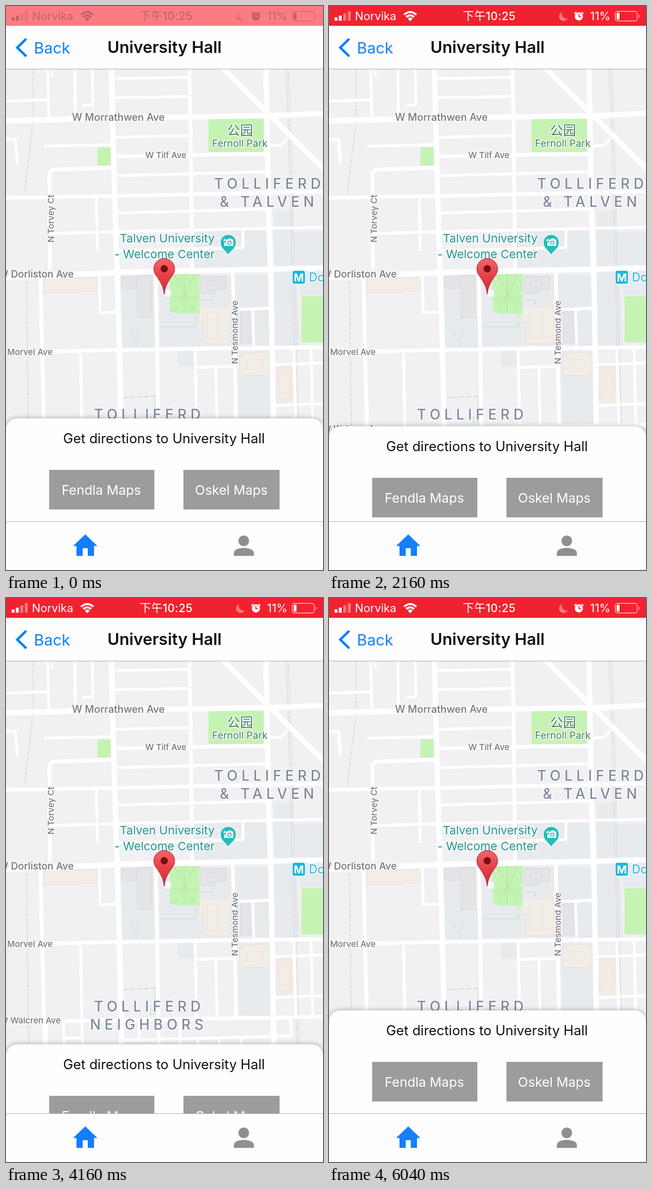
An HTML page that plays this animation: 562x997 px, repeating every 6080 ms.

```html
<!DOCTYPE html>
<html lang="en">
<head>
<meta charset="utf-8">
<title>University Hall</title>
<style>
html, body { margin: 0; width: 100%; height: 100%; overflow: hidden; background: #fff; }
svg { display: block; width: 562px; height: 997px; font-family: Inter, "Noto Sans CJK SC", "Noto Sans CJK", sans-serif; }
.road path { fill: none; stroke: #fff; stroke-linejoin: round; }
.label text { paint-order: stroke; stroke: #fbfbfc; stroke-width: 3px; stroke-linejoin: round; }
.street { fill: #77777b; font-size: 15px; font-weight: 500; }
.area { fill: #7f899b; font-size: 25px; font-weight: 500; letter-spacing: 6.9px; }
.poi { fill: #23948f; font-size: 20.7px; }
.end { text-anchor: end; }
.mid { text-anchor: middle; }
</style>
</head>
<body>
<svg viewBox="0 0 562 997">
  <defs>
    <filter id="soft" x="-10%" y="-20%" width="120%" height="140%"><feGaussianBlur stdDeviation="5"/></filter>
    <linearGradient id="red" x1="0" y1="0" x2="0" y2="1">
      <stop offset="0" stop-color="#f0666a"/><stop offset=".45" stop-color="#e5434a"/><stop offset="1" stop-color="#d42730"/>
    </linearGradient>
    <clipPath id="view"><path d="M0 112H562V911H0z"/></clipPath>
  </defs>

  <g clip-path="url(#view)">
    <rect y="112" width="562" height="800" fill="#f1f0f3"/>

    <!-- campus, buildings, parks -->
    <path fill="#e8ebee" d="M203 475H264L267 604H205zM272 475H345V601H272zM345 475H469L471 600H345zM331 400L466 395V464H331zM475 362H508L522 600H475zM508 400L562 398V512H522zM412 610H470V738H412zM305 608H333V637H305z"/>
    <path fill="#e4e4e8" stroke="#d7d8dc" d="M205 479H232V499H205zM233 476H259V551H233zM345 478H391V500H372V508H345zM416 540H436V596H416zM357 486H376V502H357z"/>
    <path fill="#f3ede8" stroke="#f1decb" d="M68 481H162V504H129V507H68zM342 532H398V597H350V560H342zM357 541H377V588H357zM415 620L430 613H466V653H415zM427 625H452V642H427zM480 638H507V703H480zM484 643H503V696H484z"/>
    <path fill="#c5f3b4" d="M359 199L457 197V258H359zM162 250H186V282H162zM290 474H343V544H302L290 540zM524 513H562V595H524z"/>
    <path fill="#f8f8fa" d="M280 502H292V514H280z"/>
    <g fill="none" stroke="#a5dea0">
      <path d="M299 476L335 541M335 476L299 541M316 476V541M292 515H341M272 567H336V545M345 520H365V528" opacity=".75"/>
      <path d="M208 692L264 690V735L256 738V726L266 733" stroke-dasharray="9 3"/>
      <path d="M231 604V590C218 585 223 572 229 569C238 572 238 586 231 590" stroke="#d6dbe0"/>
    </g>

    <!-- railways -->
    <g fill="none" stroke="#d8d9dc">
      <path d="M48 112V205L32 335M36 470L41 850M497 112L503 300L517 850M501 112L507 300L521 850"/>
      <path d="M48 112V205L32 335M36 470L41 850M499 112L505 300L519 850" stroke-width="5" stroke-dasharray="1 17"/>
      <path d="M2 375L6 850" stroke="#f5f0ec" stroke-width="4"/>
    </g>

    <!-- streets -->
    <g class="road">
      <path stroke-width="9.500" d="M187 112L191 280L197 470L201 605L207 860M461 112L465 340L470 500L476 860M0 203L190 198L470 194L562 190M0 480L200 471L562 463M380 106L470 195L562 287"/>
      <path stroke-width="6.500" d="M325 112L327 200L330 466M265 470L268 605L272 860M78 465L77 300Q77 290 87 289L187 286M61 478L64 610L70 860M0 613L200 608L562 603M100 748L562 740M0 339L190 336L562 328M193 266L462 261M402 468L405 600L408 740"/>
      <path stroke-width="4.800" d="M80 402L200 399L330 396L562 391M68 248L187 245M193 232L325 229M193 300L465 293M193 366L465 359M193 433L420 427V396M193 128L325 126M193 162L325 160M465 248L487 246L500 234M160 338L162 433M165 478L167 542L200 541M132 612L137 860M335 605L338 740M372 638L374 740M336 639L405 637M411 537L470 534M437 537L439 600"/>
      <path stroke-width="4.800" d="M74 112L76 199M82 112V125M122 112L123 198M153 112L154 177M137 175H156M0 168L75 166M0 236H17L20 280M475 634L562 631M510 606L514 740M541 606L544 740M476 706L562 703M72 750V812L104 815M102 750L104 815M103 779L134 777M205 782L505 774M236 748V780M308 745L312 860M340 778L343 860M378 777L381 860M417 776L420 860M504 742L506 775M0 819H40Q46 819 46 826V860"/>
    </g>

    <g class="label">
      <g class="street">
        <text x="117" y="203" font-size="18">W Morrathwen Ave</text>
        <text x="247" y="269">W Tilf Ave</text>
        <text class="end" x="120" y="480" font-size="17.500">W Dorliston Ave</text>
        <text x="2" y="617">Morvel Ave</text>
        <text class="end" x="97" y="752">W Walcren Ave</text>
        <text transform="translate(85 418) rotate(-90)">N Torvey Ct</text>
        <text transform="translate(411 633) rotate(-90)">N Tesmond Ave</text>
        <text class="end" transform="translate(143 813) rotate(-90)">Tolma Ave</text>
      </g>
      <g class="area">
        <text x="369" y="323">TOLLIFERD</text>
        <text x="379" y="355">&amp; TALVEN</text>
        <text x="156" y="731">TOLLIFERD</text>
        <text x="149" y="763">NEIGHBORS</text>
      </g>
      <g class="mid" fill="#3f7f55">
        <text x="415" y="228" font-size="23">公园</text>
        <text x="414.500" y="249" font-size="17.500">Fernoll Park</text>
      </g>
      <text class="poi end" x="370" y="418">Talven University</text>
      <text class="poi end" x="370" y="446">- Welcome Center</text>
      <text x="537" y="487" font-size="21" fill="#27b3d3">Dorliston</text>
    </g>

    <rect x="507" y="467" width="24" height="25" rx="4" fill="#fff"/>
    <rect x="508" y="468" width="22" height="23" rx="3" fill="#1fb9db"/>
    <text class="mid" x="519" y="486.500" font-size="19" font-weight="700" fill="#fff">M</text>

    <path fill="#20bdbb" stroke="#fff" d="M394 441C392 433 380 430 380 418A14 14 0 0 1 408 418C408 430 396 433 394 441z"/>
    <path fill="#fff" d="M390 413H392L394 411H399L401 413H403V424H387V418H390z"/>
    <circle cx="396" cy="418.500" r="3" fill="none" stroke="#20bdbb" stroke-width="1.500"/>
    <path stroke="#fff" stroke-width="1.500" d="M385 414H390M387.500 411.500V416.500"/>

    <path fill="url(#red)" stroke="#a92028" d="M280.500 510C279.500 496 274 488 267 477.500A18.500 18.500 0 1 1 294 477.500C287 488 281.500 496 280.500 510z"/>
    <circle cx="280.500" cy="464.500" r="6.500" fill="#7a0b10"/>

    <g id="sheet">
      <rect width="562" height="300" rx="20" opacity=".32" filter="url(#soft)"/>
      <rect width="562" height="300" rx="20" fill="#fefefe"/>
      <text class="mid" x="280" y="44" font-size="24" fill="#111">Get directions to University Hall</text>
      <path fill="#9d9b9e" d="M76.500 91H263V161H76.500zM314.500 91H485V161H314.500z"/>
      <g class="mid" font-size="23.300" fill="#fff">
        <text x="169" y="135">Fendla Maps</text>
        <text x="399.500" y="135">Oskel Maps</text>
      </g>
    </g>
  </g>

  <!-- header -->
  <rect y="35" width="562" height="76" fill="#fefefe"/>
  <path d="M0 111.500H562M0 911.500H562" stroke="#b3b3b6"/>
  <path d="M36 58L20 73.500L36 89" fill="none" stroke="#147efb" stroke-width="4.500"/>
  <text x="49.500" y="84" font-size="27.500" fill="#147efb">Back</text>
  <text class="mid" x="281" y="83" font-size="28.800" font-weight="600" fill="#111">University Hall</text>

  <!-- status bar -->
  <rect id="bar" width="562" height="35"/>
  <g id="ink" fill="currentColor">
    <path d="M10 20H15V26H10zM17.500 17H22.500V26H17.500z"/>
    <path d="M25.500 13H30.500V26H25.500zM33.500 9H38.500V26H33.500z" opacity=".4"/>
    <text x="46" y="25" font-size="20">Norvika</text>
    <g fill="none" stroke="currentColor" stroke-width="3.200">
      <path d="M133 15.500Q144 6 155 15.500M137 19.500Q144 13.500 151 19.500"/>
    </g>
    <path d="M139.500 22Q144 18.500 148.500 22L144 27z"/>
    <text class="mid" x="284" y="25" font-size="20" font-weight="500" letter-spacing=".3">下午10:25</text>
    <path d="M413 11A8 8 0 1 0 423 22A8.500 8.500 0 0 1 413 11z" opacity=".4"/>
    <circle cx="443" cy="18.500" r="7.200"/>
    <path d="M435 14L438.500 10.500M451 14L447.500 10.500" stroke="currentColor" stroke-width="1.800"/>
    <path id="hands" d="M443 14V19H447" fill="none" stroke-width="1.600"/>
    <text x="463" y="25" font-size="20">11%</text>
    <rect x="507.500" y="9.500" width="39" height="17" rx="4" fill="none" stroke="currentColor" stroke-width="1.500" opacity=".65"/>
    <path d="M549 14Q552 18 549 22z" opacity=".6"/>
    <rect x="510" y="12" width="5" height="12" rx="1"/>
  </g>

  <!-- tab bar -->
  <rect y="912" width="562" height="85" fill="#fdfdfd"/>
  <path fill="#147efb" d="M140.500 934L162 954.500H156V972H145V958.500H136V972H125V954.500H119z"/>
  <g fill="#8f8f93">
    <circle cx="421.500" cy="945.500" r="9.500"/>
    <path d="M404 972V967C404 960 414 958 421.500 958S439.500 960 439.500 967V972z"/>
  </g>
</svg>
<script>
const LOOP = 6080, OPEN = 729, TRAVEL = 123;
const get = id => document.getElementById(id);
const bar = get("bar"), ink = get("ink"), hands = get("hands"), sheet = get("sheet");

// [start, end, direction]: 1 lowers the sheet, -1 raises it
const moves = [[640, 1200, 1], [1820, 2250, -1], [3885, 4445, 1], [5220, 5650, -1]];

const ramp = (t, a, b) => Math.min(1, Math.max(0, (t - a) / (b - a)));
const ease = u => u * u * (3 - 2 * u);
const mix = (a, b, k) => `rgb(${a.map((v, i) => Math.round(v + (b[i] - v) * k))})`;

function draw(t) {
  const low = moves.reduce((sum, [a, b, dir]) => sum + dir * ease(ramp(t, a, b)), 0);
  sheet.setAttribute("transform", `translate(0 ${Math.round(OPEN + TRAVEL * low)})`);

  const k = ramp(t, 20, 200);
  const red = mix([253, 124, 130], [241, 34, 47], k);
  bar.setAttribute("fill", red);
  hands.setAttribute("stroke", red);
  ink.style.color = mix([190, 98, 103], [255, 255, 255], k);
}

const begin = performance.now();
function tick() {
  draw((performance.now() - begin) % LOOP);
  requestAnimationFrame(tick);
}
tick();
</script>
</body>
</html>
```
